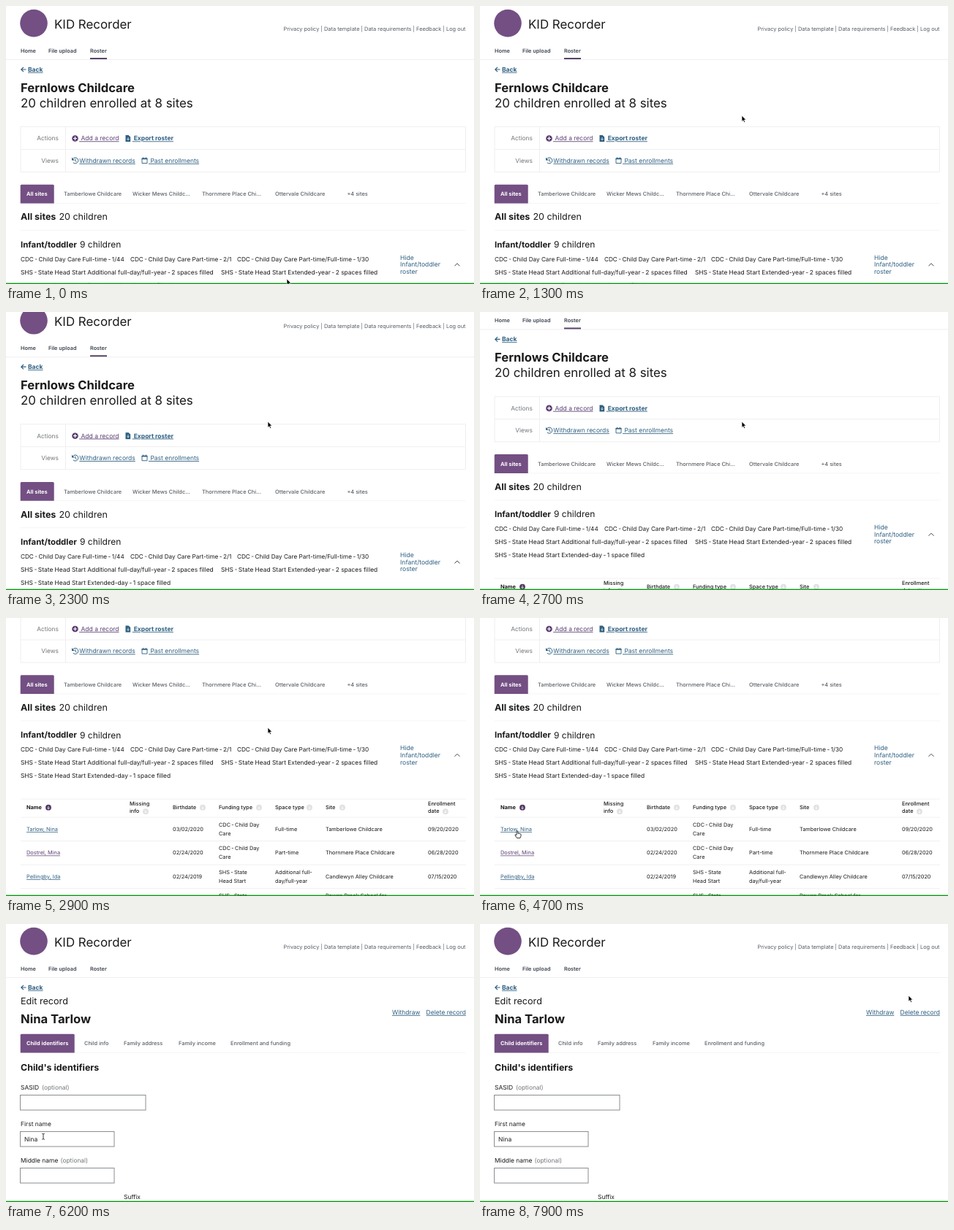
An HTML page that plays this animation: 640x381 px, repeating every 8 s.

```html
<!DOCTYPE html>
<html lang="en">
<head>
<meta charset="utf-8">
<title>Childcare roster</title>
<style>
  html, body { margin: 0; width: 100%; height: 100%; overflow: hidden; background: #fff; }
  svg { display: block; width: 100%; height: 100%; }
  text { font-family: Inter, "Open Sans", sans-serif; text-rendering: geometricPrecision; white-space: pre; }
  .link { text-decoration: underline; text-decoration-thickness: .7px; text-underline-offset: 1.2px; }
</style>
</head>
<body>
<svg id="stage" viewBox="0 0 640 381"></svg>
<script>
const INK = '#1b1b1b', GREY = '#71767a', TAB_GREY = '#5c6066', LINK = '#2e5f80',
      VISITED = '#5a3f72', PURPLE = '#734f83', RULE = '#efeff0';
const LOOP = 8000, PAGE_SWAP = 5700;

// Text placed by its left edge and the middle of its capitals.
function text(x, y, content, size = 8.45, { fill = INK, weight = 400, link = false, anchor = 'start' } = {}) {
  const tight = content.replaceAll(' - ', '\u2009-\u2009');
  return `<text x="${x}" y="${y + size * .335}" font-size="${size}" font-weight="${weight}" fill="${fill}"
    text-anchor="${anchor}" ${link ? 'class="link"' : ''}>${tight}</text>`;
}
const link = (x, y, content, fill = LINK, weight = 400) =>
  text(x, y, content, 8.5, { fill, weight, link: true });
const lines = (x, y, gap, rows, size, style) =>
  rows.map((row, i) => text(x, y + i * gap, row, size, style)).join('');
const rect = (x, y, w, h, fill, more = '') =>
  `<rect x="${x}" y="${y}" width="${w}" height="${h}" fill="${fill}" ${more}/>`;
const stroke = (d, color, width = 1, more = '') =>
  `<path d="${d}" fill="none" stroke="${color}" stroke-width="${width}" ${more}/>`;
const rule = (y, x1 = 20, x2 = 629, color = RULE) => stroke(`M${x1} ${y}H${x2}`, color);

function header(rosterActive) {
  const nav = { weight: 600, fill: '#3d4551' };
  return `<circle cx="38" cy="23.6" r="18.8" fill="${PURPLE}"/>`
    + text(66, 25, 'KID Recorder', 16.9)
    + text(628.5, 31.5, 'Privacy policy | Data template | Data requirements | Feedback | Log out',
        7.42, { fill: '#565c65', anchor: 'end' })
    + text(20, 61.5, 'Home', 7.3, nav) + text(58, 61.5, 'File upload', 7.3, nav)
    + text(115, 61.5, 'Roster', 7.3, nav)
    + rule(73.5, 0, 640, '#f0f0f1')
    + (rosterActive ? rect(115, 71, 23, 2, '#57446a') : '')
    + stroke('M27.5 87H21M24 83.8L20.8 87L24 90.2', LINK, 1.2)
    + link(30, 87, 'Back', LINK, 700);
}

function tabs(y, width, active, others) {
  return rule(y + 25.5, 20, 629, '#f5f5f6')
    + `<path d="M19.7 ${y + 25.5}V${y + 1.2}q0-1.5 1.5-1.5H${18.2 + width}q1.5 0 1.5 1.5V${y + 25.5}z" fill="${PURPLE}"/>`
    + text(28, y + 13, active, 7.4, { fill: '#fff', weight: 700 })
    + others.map(([x, label]) => text(x, y + 13, label, 7.4, { fill: TAB_GREY, weight: 500 })).join('');
}

function actionPanel() {
  const label = { fill: GREY, anchor: 'end' };
  return stroke('M20 165.5H628.5V227.5H20zM20 196.5H628.5M81.5 165.5V227.5', RULE)
    + text(72, 181.5, 'Actions', 8.4, label) + text(72, 212, 'Views', 8.4, label)
    + `<circle cx="94.5" cy="181.5" r="4.3" fill="${VISITED}"/>`
    + stroke('M92 181.5h5M94.5 179v5', '#fff', 1.2)
    + link(100.1, 181.5, '\u00a0Add a record', VISITED)
    + `<path d="M163.5 177h4l2.7 2.6v6.4h-6.7z" fill="${LINK}"/>`
    + stroke('M167 180v3.6M165.4 182.2l1.6 1.6l1.6-1.6', '#fff', .8)
    + link(172.7, 181.5, '\u00a0Export roster', LINK, 700)
    + stroke('M91.6 209.4a4 4 0 1 1 .3 5.2M94.8 209.6v2.7l1.8 1.2', LINK, 1)
    + `<path d="M90 207.6v3.8h3.8z" fill="${LINK}"/>`
    + link(100.3, 212, 'Withdrawn records')
    + stroke('M186 209h7v6.5h-7zM187.6 207.3v1.7M191.4 207.3v1.7', LINK, .9)
    + rect(185.6, 208.6, 7.8, 1.6, LINK)
    + link(195, 212, '\u00a0Past enrollments');
}

const sortIcon = (x, y, color) => `<circle cx="${x}" cy="${y}" r="3.9" fill="${color}"/>`
  + stroke(`M${x} ${y - 2}v4M${x - 1.6} ${y + .4}l1.6 1.6l1.6-1.6`, '#fff', .8);

function table(top) {
  const columns = [
    [28, ['Name'], 58], [169, ['Missing', 'info'], 191], [228, ['Birthdate'], 269],
    [291, ['Funding type'], 346], [368, ['Space type'], 415], [437, ['Site'], 460],
    [577, ['Enrollment', 'date'], 601]];
  const cdc = ['CDC - Child Day', 'Care'], shs = ['SHS - State', 'Head Start'];
  const records = [
    ['Tarlow, Nina', '03/02/2020', cdc, ['Full-time'], ['Tamberlowe Childcare'], '09/20/2020'],
    ['Dostrel, Mina', '02/24/2020', cdc, ['Part-time'], ['Thornmere Place Childcare'], '06/28/2020'],
    ['Pellingby, Ida', '02/24/2019', shs, ['Additional full-', 'day/full-year'], ['Candlewyn Alley Childcare'], '07/15/2020'],
    ['Osk, Tilda', '01/12/2019', shs, ['Extended-day'], ['Rowan Brook School for', 'Toddlers'], '07/15/2020']];
  const cell = (x, y, rows) => lines(x, y - (rows.length - 1) * 6, 12, rows, 7.35);
  return rule(top, 20, 629, '#f3f3f4')
    + columns.map(([x, label, iconX], i) => {
        const two = label.length > 1;
        return lines(x, top + (two ? 6.5 : 11), 9.7, label, 7.35, { weight: i ? 500 : 700 })
          + sortIcon(iconX, top + (two ? 17 : 11.5), i ? '#dfe1e2' : '#523a63');
      }).join('')
    + rule(top + 25, 20, 629, '#f1f1f2')
    + records.map(([name, born, funding, space, site, enrolled], i) => {
        const y = top + 41.3 + i * 32.5;
        return text(28, y, name, 7.4, { fill: i === 1 ? VISITED : LINK, link: true })
          + cell(228, y, [born]) + cell(291, y, funding) + cell(368, y, space)
          + cell(437, y, site) + cell(577, y, [enrolled]) + rule(top + 57.5 + i * 32.5);
      }).join('');
}

function rosterPage() {
  return header(true)
    + text(20, 112.5, 'Fernlows Childcare', 16.6, { weight: 700 })
    + text(20, 133.2, '20 children enrolled at 8 sites', 16.9)
    + actionPanel()
    + tabs(245, 46, 'All sites', [[79, 'Tamberlowe Childcare'], [173, 'Wicker Mews Childc...'],
        [268, 'Thornmere Place Chi...'], [368, 'Ottervale Childcare'], [466.4, '+4 sites']])
    + text(20, 289.3, 'All sites', 12.5, { weight: 700 }) + text(72.4, 289.3, '20 children', 12.5)
    + rule(307.5, 20, 629, '#f5f5f6')
    + text(20, 327, 'Infant/toddler', 11.4, { weight: 700 }) + text(101, 327, '9 children', 12)
    + text(20, 347, 'CDC - Child Day Care Full-time - 1/44', 8.18)
    + text(170, 347, 'CDC - Child Day Care Part-time - 2/1', 8.18)
    + text(316, 347, 'CDC - Child Day Care Part-time/Full-time - 1/30', 8.18)
    + text(20, 365, 'SHS - State Head Start Additional full-day/full-year - 2 spaces filled', 8.38)
    + text(294, 365, 'SHS - State Head Start Extended-year - 2 spaces filled', 8.38)
    + text(20, 383, 'SHS - State Head Start Extended-day - 1 space filled', 8.38)
    + lines(539, 345, 9.6, ['Hide', 'Infant/toddler', 'roster'], 8.6, { fill: LINK })
    + stroke('M613.5 356.3L617 352.8L620.5 356.3', '#3d4551', 1)
    + table(414.7);
}

function editPage() {
  const input = (y, width) => rect(19.5, y, width, 20.5, '#fff', 'stroke="#8a8d91"');
  const optional = (x, y) => text(x, y, '(optional)', 8.4, { fill: GREY });
  return header(false)
    + text(20, 106, 'Edit record', 12.6)
    + text(20, 130.3, 'Nina Tarlow', 16.6, { weight: 700 })
    + link(528, 121, 'Withdraw') + link(574.6, 121, 'Delete record')
    + tabs(151, 74, 'Child identifiers', [[107, 'Child info'], [161, 'Family address'],
        [236, 'Family income'], [307, 'Enrollment and funding']])
    + text(20, 197, "Child's identifiers", 12.4, { weight: 700 })
    + text(20, 224, 'SASID') + optional(49, 224) + input(234.5, 171.5)
    + text(20, 274, 'First name') + input(284.5, 128.5) + text(25, 295, 'Nina')
    + text(20, 324, 'Middle name') + optional(74.5, 324) + input(334.5, 128.5)
    + text(161, 374.5, 'Suffix');
}

const pointers = {
  arrow: '<path d="M0 0V8.2L1.9 6.5L3.2 9.4L4.6 8.8L3.3 5.9H5.8z" fill="#000" stroke="#fff" stroke-width=".7"/>',
  hand: `<path d="M-1 .8q0-1 .9-1t.9 1v2.6q2.8-.3 4.2 1v2.4l-1 2.8H-.6L-3 5.8q-.2-1 .8-1l1.2.9z"
    fill="#fff" stroke="#222" stroke-width=".9"/>`,
  beam: stroke('M-1.8-4Q0-4 0-3Q0-4 1.8-4M0-3V3M-1.8 4Q0 4 0 3Q0 4 1.8 4', '#222', .9)
};

const stage = document.getElementById('stage');
stage.innerHTML = rect(0, 0, 640, 381, '#fff')
  + `<g id="roster">${rosterPage()}</g><g id="edit">${editPage()}</g>`
  + rect(0, 379.6, 640, 1.4, '#0f9a18')
  + '<g id="pointer">' + Object.entries(pointers).map(([id, shape]) => `<g id="${id}">${shape}</g>`).join('') + '</g>';
const node = Object.fromEntries(['roster', 'edit', 'pointer', ...Object.keys(pointers)]
  .map(id => [id, document.getElementById(id)]));
const show = (id, on) => node[id].setAttribute('visibility', on ? 'inherit' : 'hidden');

const linear = u => u, smooth = u => u * u * (3 - 2 * u), easeOut = u => 1 - (1 - u) ** 2;
// Each key is [time, values, easing from the previous key].
const scrollKeys = [[1800, [0]], [2100, [6.5], linear], [2500, [17], linear], [2700, [49], linear], [2900, [166.5], linear]];
const pointerKeys = [[100, [384, 374]], [1000, [358, 150.2], smooth], [3300, [358, 150.2], linear],
  [4500, [51, 292], smooth], [6700, [51, 291], linear], [7900, [586, 98], easeOut]];

function sample(keys, time) {
  const next = keys.findIndex(([at]) => at > time);
  if (next === 0) return keys[0][1];
  if (next < 0) return keys.at(-1)[1];
  const [start, from] = keys[next - 1], [end, to, ease] = keys[next];
  const u = ease((time - start) / (end - start));
  return from.map((value, i) => value + (to[i] - value) * u);
}

function draw(now) {
  const time = now % LOOP, editing = time >= PAGE_SWAP;
  const [scroll] = sample(scrollKeys, time), [x, y] = sample(pointerKeys, time);
  show('roster', !editing);
  show('edit', editing);
  node.roster.setAttribute('transform', `translate(0 ${-scroll})`);
  node.pointer.setAttribute('transform', `translate(${x} ${y})`);
  const shape = editing && x < 148 && y > 285 ? 'beam'
    : !editing && x < 76 && y > 284 ? 'hand' : 'arrow';
  for (const id in pointers) show(id, id === shape);
  requestAnimationFrame(draw);
}
draw(performance.now());
</script>
</body>
</html>
```
